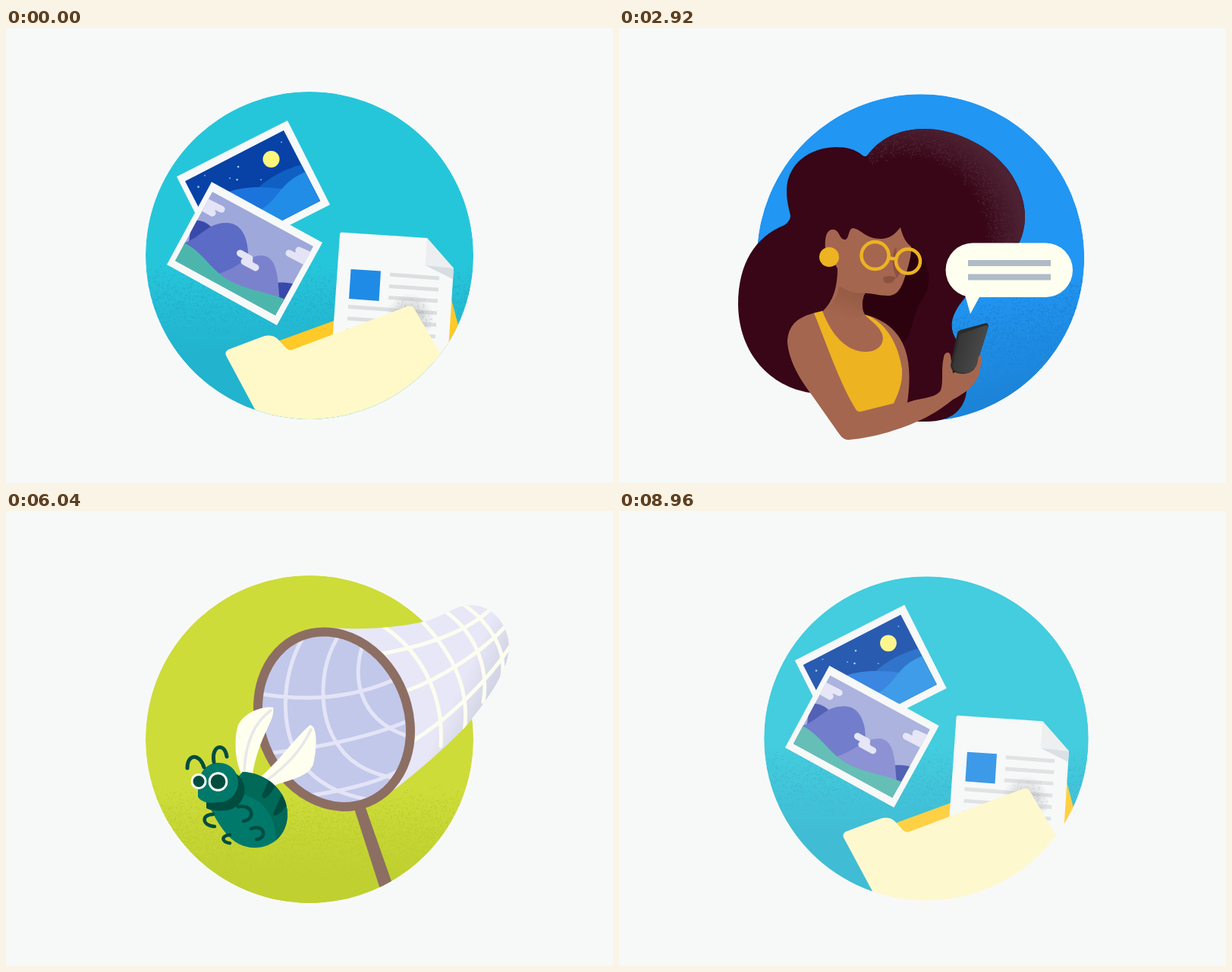
An HTML page that plays this animation: 800 by 600 pixels, repeating every 9 s.

```html
<!DOCTYPE html>
<html lang="en">
<head>
<meta charset="utf-8">
<title>Three scenes</title>
<style>
  html, body { margin: 0; width: 100%; height: 100%; overflow: hidden; background: #f7f9f9; }
  svg { display: block; width: 100%; height: 100%; }
  .line { fill: none; stroke-linecap: round; stroke-linejoin: round; }
</style>
</head>
<body>
<svg viewBox="0 0 800 600">
  <defs>
    <clipPath id="disc1"><circle cx="400" cy="300" r="216"/></clipPath>
    <clipPath id="disc2"><circle cx="397.5" cy="303" r="215.7"/></clipPath>
    <clipPath id="disc3"><circle cx="400" cy="301" r="216"/></clipPath>
    <clipPath id="night"><path d="M236,202L366,135L414,228L284,295Z"/></clipPath>
    <clipPath id="day"><path d="M272,216L405,288L355,379L223,307Z"/></clipPath>
    <clipPath id="lobe"><path id="lobeShape" d="M327,169C342,148 365,134 400,133C440,132 495,155 520,198C536,225 540,255 528,282L400,300Z"/></clipPath>
    <clipPath id="bag"><path id="bagShape" d="M422,153C468,159 530,152 558,144C585,134 593,124 614,124C642,125 662,150 663,178C664,210 630,255 605,285C575,316 545,341 515,365L480,388Z"/></clipPath>
    <clipPath id="rim"><ellipse id="rimShape" cx="432.5" cy="274.7" rx="97.3" ry="118" transform="rotate(-22 432.5 274.7)"/></clipPath>
    <clipPath id="body"><path id="bodyShape" d="M268,390C280,412 295,444 328,444C353,444 371,425 371,400C371,368 342,345 312,344Z"/></clipPath>
    <linearGradient id="shade1" gradientUnits="userSpaceOnUse" x1="0" y1="310" x2="0" y2="430">
      <stop offset="0" stop-color="#22b3cf" stop-opacity="0"/><stop offset="1" stop-color="#22b3cf"/>
    </linearGradient>
    <linearGradient id="shade2" gradientUnits="userSpaceOnUse" x1="500" y1="340" x2="530" y2="480">
      <stop offset="0" stop-color="#1c84d8" stop-opacity="0"/><stop offset="1" stop-color="#1c84d8"/>
    </linearGradient>
    <linearGradient id="shade3" gradientUnits="userSpaceOnUse" x1="0" y1="370" x2="0" y2="480">
      <stop offset="0" stop-color="#bfd030" stop-opacity="0"/><stop offset="1" stop-color="#bfd030"/>
    </linearGradient>
    <linearGradient id="bagShade" gradientUnits="userSpaceOnUse" x1="592" y1="242" x2="635" y2="262">
      <stop offset="0" stop-color="#cfd2e2" stop-opacity="0"/><stop offset="1" stop-color="#cfd2e2"/>
    </linearGradient>
    <radialGradient id="shine" gradientUnits="userSpaceOnUse" cx="375" cy="280" r="158">
      <stop offset=".68" stop-color="#4d2233" stop-opacity="0"/><stop offset="1" stop-color="#4d2233"/>
    </radialGradient>
    <radialGradient id="docShade" gradientUnits="userSpaceOnUse" cx="532" cy="382" r="32">
      <stop offset="0" stop-color="#9a9a9e" stop-opacity=".6"/><stop offset="1" stop-color="#9a9a9e" stop-opacity="0"/>
    </radialGradient>
    <linearGradient id="neckShade" gradientUnits="userSpaceOnUse" x1="312" y1="345" x2="298" y2="385">
      <stop offset="0" stop-color="#945a42"/><stop offset="1" stop-color="#a56650"/>
    </linearGradient>
    <linearGradient id="phone" gradientUnits="userSpaceOnUse" x1="440" y1="420" x2="475" y2="430">
      <stop offset="0" stop-color="#333"/><stop offset="1" stop-color="#484848"/>
    </linearGradient>
  </defs>

  <!-- Files -->
  <g id="files" clip-path="url(#disc1)">
    <circle cx="400" cy="300" r="216" fill="#26c6da"/>
    <rect x="184" y="300" width="432" height="216" fill="url(#shade1)"/>
    <path id="grain1" fill="#22b0cc"/>

    <path fill="#f7f9f9" d="M225,196L371,122L427,233L281,307Z"/>
    <g clip-path="url(#night)">
      <path fill="#0842a6" d="M220,120H440V310H220Z"/>
      <path fill="#1060c4" d="M326,216C347,197 365,186 397,178L420,230L330,280Z"/>
      <path fill="#1b74dc" d="M285,220C308,207 345,209 370,213L380,260L280,300Z"/>
      <path fill="#218de6" d="M325,244C362,232 355,203 400,188L430,240L290,310Z"/>
      <circle cx="349.5" cy="173" r="11" fill="#fff67c"/>
      <path class="line" stroke="#8fd4f5" stroke-width="2.6" d="M306,183h.1M304.5,200h.1M253.5,209.5h.1"/>
      <path class="line" stroke="#6fc0ee" stroke-width="1.8" d="M262,194.5h.1M295,198h.1M336,200h.1M363,150.5h.1"/>
    </g>

    <path fill="#f7f9f9" d="M271,203L417,283L357,392L212,312Z"/>
    <g clip-path="url(#day)">
      <path fill="#9fa8da" d="M210,200H420V395H210Z"/>
      <path fill="#3949ab" d="M245,253Q262,253 271,263L240,290Z"/>
      <path fill="#3949ab" d="M354,336Q370,334 385,339L364,368Z"/>
      <path fill="#5c6bc5" d="M232,284C258,277 264,256 292,257C314,258 320,284 319,303L285,335Z"/>
      <path fill="#7b82cd" d="M275,325C303,320 315,300 338,300C360,302 358,336 361,362L320,352Z"/>
      <path fill="#4db6ac" d="M230,281C256,291 268,316 288,329C312,346 345,347 370,359L355,385L215,308Z"/>
      <path class="line" stroke="#e4e4f6" stroke-width="9" d="M262,228L284,239M258,236L272,244M267,235L272,238M308.5,297L321,304M314,308L329,316M317,303L321,309M373,297L392,307M386,293L410,304M385,298L394,302"/>
    </g>

    <path fill="#ffca28" d="M350,416L570,336Q581,334 584,346L606,430L400,480Z"/>
    <path fill="#f7f9f9" d="M440,272Q440,269 443,269.5L555,277L590,317L582,440L429,430Z"/>
    <path fill="#eceeef" d="M555,277L590,317L552.5,313Z"/>
    <path fill="#d6dde3" d="M552.5,313L590,317L588.5,331Z"/>
    <path fill="#1f8be6" d="M454.5,318L494,320.5L491.5,360L452,357Z"/>
    <path fill="none" stroke="#dcdfe0" stroke-width="5" d="M506,325L571,330M505,340.5L570,345M504,355.5L569,360M451,367.5L568,376M450,383L567,391.5M449,398.5L566,407"/>
    <circle cx="532" cy="382" r="32" fill="url(#docShade)"/>
    <path id="grainDoc" fill="#9a9a9e" opacity=".35"/>
    <path fill="#fff9c9" d="M335,516L290,432Q288,427 293,424L338,407Q350,403 358,410L369,422Q373,426 378,424L529,367Q535,365 538,370L580,442L560,520Z"/>
  </g>

  <!-- Chat -->
  <g id="chat">
    <g clip-path="url(#disc2)">
      <circle cx="397.5" cy="303" r="215.7" fill="#2196f3"/>
      <rect x="430" y="330" width="190" height="190" fill="url(#shade2)"/>
      <path id="grain2" fill="#1c82d4"/>
    </g>
    <path fill="#380616" d="M528,282C505,315 470,335 455,357C440,375 433,392 444,410C455,440 460,465 458,480C455,502 440,519 405,519L388,519L252,481C200,473 158,430 157,365C157,310 180,275 218,260Q226,254 226,248C226,245 221,232 221,215C221,180 250,158 285,157C300,157 312,160 321,168Q325,171 328,167C342,148 365,134 400,133C440,132 495,155 520,198C536,225 540,255 528,282Z"/>
    <use href="#lobeShape" fill="url(#shine)"/>
    <path id="grainHair" clip-path="url(#lobe)" fill="#4d2233"/>
    <path fill="#2c020e" d="M383,285C408,300 416,335 400,357C384,380 388,410 372,415L320,385L322,345Z"/>

    <path fill="#a56650" d="M272,292C270,270 277,264 284,266C291,268 291,280 298,279C304,278 302,263 309,264C320,266 325,278 345,278C360,278 366,268 371,263C374,276 379,284 385,288C386,302 379,322 375,334C370,347 364,353 355,353C340,353 331,349 324,350C319,360 320,372 324,378C350,384 376,402 381,440C384,460 382,480 380,494C398,487 416,489 424,478C428,465 424,450 428,434C429,427 436,426 437,432L440,455L470,445L474,432Q479,430 478,438L474,456C470,472 455,482 440,490C424,503 409,512 393,519C375,527 340,540 303,543Q296,544 290,535L252,481C240,465 224,440 222,415C222,393 235,378 268,374C283,360 288,340 288,317Z"/>
    <path fill="url(#neckShade)" d="M290,340Q303,350 324,350C319,360 320,372 324,378L300,390L270,375C284,362 289,350 290,340Z"/>
    <path fill="#8d513f" d="M364,290Q356,307 366,330L370,324Q363,307 366,290ZM348,329Q357,325 365,329L361,335Q352,339 349,334Z"/>
    <path fill="#edb321" d="M257,376L268,373C280,405 300,427 325,427C346,427 351,411 346,402C342,392 333,388 324,378L332,381C352,392 368,415 373,450C374,470 367,484 362,495L318,506Q313,506 311,501C290,466 275,420 257,376Z"/>
    <g class="line" stroke="#edb321" stroke-width="4.5">
      <circle cx="337.5" cy="300" r="18"/>
      <circle cx="381" cy="307.5" r="16"/>
      <path d="M356,303.5L365,304.5"/>
    </g>
    <circle cx="277" cy="302" r="13" fill="#edb321"/>

    <path fill="#2b2b2b" d="M446,402Q447,399 451,398L482,389.5Q488,388 486.5,395L471,445Q466,456 454,456Q437,456 437,444Z"/>
    <path fill="url(#phone)" d="M449,404L482,392.5Q487,391 486,396L471,445Q466,455 455,455Q440,455 440,445Z"/>
    <path fill="#a56650" d="M470,455L474,433Q479,430 478,438L474,460Z"/>
    <rect x="430.5" y="283.5" width="167.5" height="71.5" rx="35.7" fill="#fffff0"/>
    <path fill="#fffff0" d="M456,352L463,377L476,353Z"/>
    <path fill="#b0bbc8" d="M460,306h109v8h-109zM460,324.5h109v8h-109z"/>
  </g>

  <!-- Bug net -->
  <g id="bug">
    <g clip-path="url(#disc3)">
      <circle cx="400" cy="301" r="216" fill="#cddc39"/>
      <rect x="184" y="360" width="432" height="160" fill="url(#shade3)"/>
      <path id="grain3" fill="#bdce2f"/>
      <path fill="#8d6e63" d="M458.5,391L472.5,387L512.5,501L495.5,506Z"/>
    </g>
    <use href="#bagShape" fill="#e8e7f7"/>
    <g clip-path="url(#bag)">
      <use href="#bagShape" fill="url(#bagShade)"/>
      <path class="line" stroke="#fcfdf0" stroke-width="5" d="M498,153C540,180 578,235 573,310M548,145C590,190 612,235 604,292M581,134C617,160 637,205 629,252M604,124C638,148 662,185 653,222M495,188C560,177 612,156 640,128M525,238C575,221 632,182 660,150M535,304C590,270 642,215 666,176"/>
    </g>
    <g clip-path="url(#rim)">
      <path fill="#c2c8ea" d="M320,150H545V400H320Z"/>
      <path class="line" stroke="#e4e4f7" stroke-width="5" d="M391,168C360,220 360,300 396,340C420,366 450,376 485,382M438,165C412,207 410,272 440,312C457,337 490,350 520,353M472,172C455,215 462,275 530,297M335,241C400,252 460,246 515,221M350,319C420,311 480,298 532,276M385,377C440,371 490,358 518,342"/>
    </g>
    <use href="#rimShape" fill="none" stroke="#8d6e63" stroke-width="12"/>

    <g fill="#fffff0">
      <path d="M310,346C302,330 300,300 306,282C314,267 335,257 352,259C356,275 334,295 325,346Z"/>
      <path d="M334,352C360,330 380,300 401,282C412,285 409,318 405,334C398,351 375,354 350,363Z"/>
    </g>
    <path class="line" stroke="#e6e8e8" stroke-width="3.5" d="M349,263C328,278 316,303 314,342M402,288C390,314 372,334 344,355"/>
    <use href="#bodyShape" fill="#00796b"/>
    <g clip-path="url(#body)">
      <path fill="#016957" d="M312,340H380V440H356C357,400 338,378 305,372Z"/>
      <path fill="#004d40" d="M347,354L357,358Q350,374 341,379Q336,379 338,373ZM364,372L373,382Q366,397 355,402Q350,401 354,395Z"/>
    </g>
    <circle cx="287.5" cy="368" r="27" fill="#004d40"/>
    <path fill="#004d40" d="M264,382L285,380V395Q273,396 264,392Z"/>
    <path fill="#00796b" d="M255,352C259,339 268,332 280,332C296,332 306,344 306,358C306,374 293,385 279,384C268,386 257,384 253,377V366Z"/>
    <g fill="#004d40" stroke="#fffff0" stroke-width="3">
      <circle cx="254" cy="356.5" r="9"/>
      <circle cx="279.5" cy="357" r="11.3"/>
    </g>
    <path class="line" stroke="#004d40" stroke-width="5" d="M261,338C255,319 239,320 239,339M274,331C270,309 288,304 291,324"/>
    <path class="line" stroke="#004d40" stroke-width="4.5" d="M273,400C257,400 258,415 275,416M295,427C283,428 284,437 295,438M306,390C325,386 330,406 313,409M323,419C341,412 345,432 330,433"/>
  </g>
</svg>
<script>
const TICK = 40, LOOP = 9000;

// Speckled shading: small squares kept with a probability given by density(x, y).
let seed = 7;
const random = () => (seed = (seed * 16807) % 2147483647) / 2147483647;
function grain(id, x, y, w, h, count, density) {
  let d = '';
  for (let i = 0; i < count; i++) {
    const px = x + random() * w, py = y + random() * h;
    if (random() < density(px, py)) d += `M${px.toFixed(1)},${py.toFixed(1)}h1.4v1.4h-1.4z`;
  }
  document.getElementById(id).setAttribute('d', d);
}
const bump = (v, mid, half) => Math.max(0, 1 - Math.abs(v - mid) / half);
grain('grain1', 184, 300, 432, 130, 7000, (x, y) => bump(y, 365, 55));
grain('grain2', 430, 330, 190, 150, 4000, (x, y) => bump(y + (x - 520) * .2, 400, 65));
grain('grain3', 184, 350, 432, 160, 12000, (x, y) => bump(y, 430, 70));
grain('grainDoc', 500, 355, 62, 40, 500, (x, y) => bump(Math.hypot(x - 532, y - 382), 0, 32));
grain('grainHair', 327, 133, 210, 165, 5000, (x, y) => bump(Math.hypot(x - 375, y - 280), 135, 30));

// enter/leave: start times; steps: ticks to arrive; lead and power: shape of the exit.
const scenes = [
  { id: 'files', enter: 8800, steps: 6, leave: 2400, lead: .08, power: 1.7 },
  { id: 'chat', enter: 2760, steps: 5, leave: 5520, lead: .08, power: 1.7 },
  { id: 'bug', enter: 5840, steps: 6, leave: 8480, lead: .1, power: 1 }
];
for (const s of scenes) s.node = document.getElementById(s.id);

function pose(scene, t) {
  const since = start => Math.floor(((t - start + LOOP) % LOOP) / TICK);
  const stay = (scene.leave - scene.enter + LOOP) % LOOP / TICK;
  const k = since(scene.enter);
  if (k < scene.steps) {
    const away = .85 * (1 - k / (scene.steps - 1));
    return { away, x: 110 * away ** 1.75 };
  }
  if (k < stay) return { away: 0, x: 0 };
  const away = Math.min(1, scene.lead + .26 * since(scene.leave));
  return { away, x: -100 * away ** scene.power };
}

function draw(now) {
  const t = now % LOOP;
  for (const s of scenes) {
    const { away, x } = pose(s, t);
    s.node.setAttribute('visibility', away < 1 ? 'visible' : 'hidden');
    s.node.setAttribute('opacity', 1 - away ** 1.1);
    s.node.setAttribute('transform', `translate(${400 + x} 300) scale(${1 - .06 * away}) translate(-400 -300)`);
  }
}

const begin = performance.now();
function loop() {
  draw(performance.now() - begin);
  requestAnimationFrame(loop);
}
loop();
</script>
</body>
</html>
```
